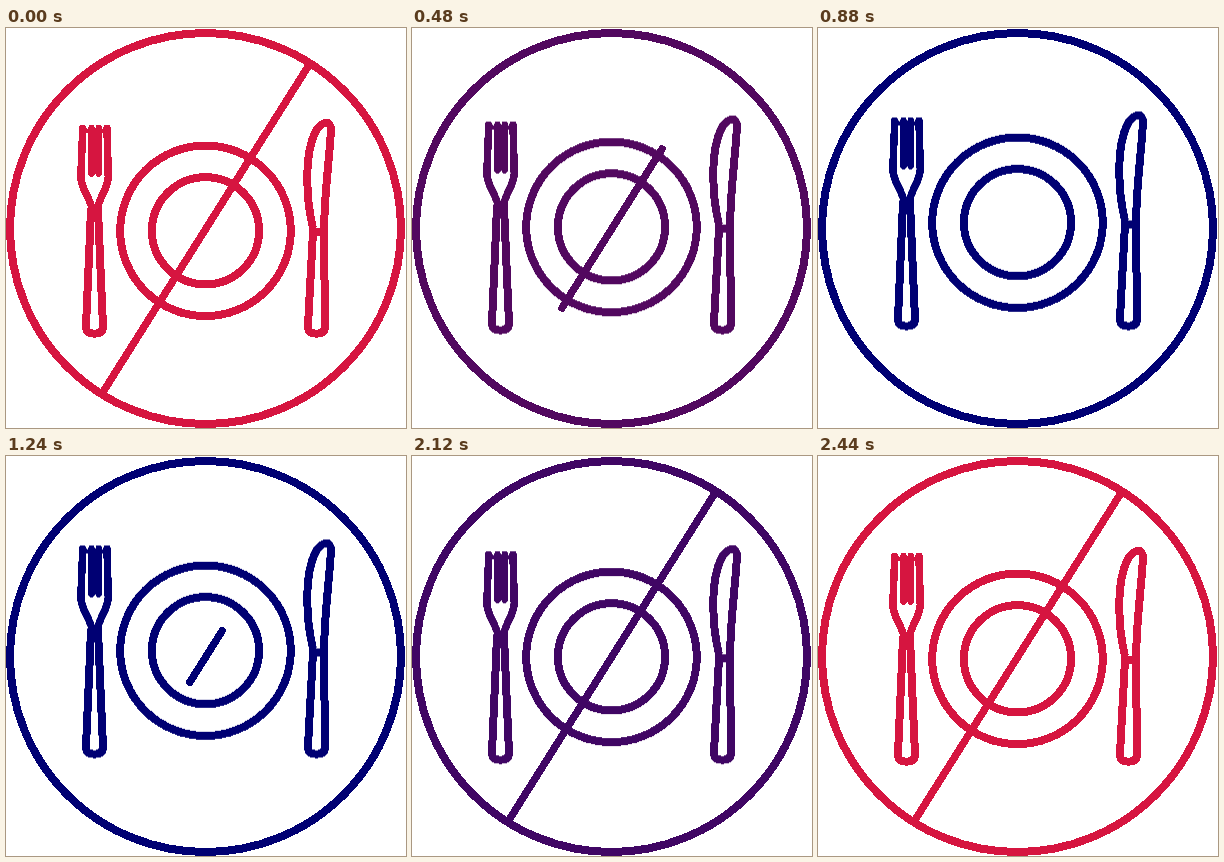
Animation, 400 px wide and 400 px high, one loop 2.64 s. Source, as an HTML page:

```html
<!DOCTYPE html>
<html lang="en">
<head>
<meta charset="utf-8">
<title>No food</title>
<style>
  :root {
    --red: #d61540;
    --navy: #000073;
  }
  html, body {
    margin: 0;
    width: 100%;
    height: 100%;
    overflow: hidden;
    background: #fff;
  }
  svg {
    display: block;
    width: 100vw;
    height: 100vh;
    fill: none;
    stroke: currentColor;
    stroke-width: 8;
    stroke-linecap: round;
    stroke-linejoin: round;
    shape-rendering: crispEdges;
    animation: tint 2640ms infinite;
  }
  .plate { --rise: -8.2px; }
  .cutlery { --rise: -7.5px; }
  .lift { animation: lift 2640ms infinite; }
  .prong { stroke-width: 7.5; }
  .tine { stroke-width: 6.5; }
  .join { stroke-width: 4; }
  .slash {
    stroke-width: 7.5;
    stroke-dasharray: 1 3;
    animation: slash 2640ms infinite;
  }

  @keyframes tint {
    0% { color: var(--red); }
    6.06% { color: var(--red); animation-timing-function: cubic-bezier(.333, .18, .667, .88); }
    27.27% { color: var(--navy); }
    73.48% { color: var(--navy); animation-timing-function: cubic-bezier(.333, 0, .667, 1); }
    92.42%, 100% { color: var(--red); }
  }
  @keyframes lift {
    0% { transform: translateY(0); }
    6.06% { transform: translateY(0); animation-timing-function: cubic-bezier(.333, 0, .667, 1); }
    31.82% { transform: translateY(var(--rise)); }
    63.64% { transform: translateY(var(--rise)); animation-timing-function: cubic-bezier(.333, 0, .667, 1); }
    87.88%, 100% { transform: translateY(0); }
  }
  /* an offset above 1 also hides the round cap at the centre */
  @keyframes slash {
    0% { stroke-dashoffset: 0; }
    12.12% { stroke-dashoffset: 0; animation-timing-function: cubic-bezier(.333, 0, .667, 1); }
    24.1% { stroke-dashoffset: 1; }
    24.11%, 37.87% { stroke-dashoffset: 1.1; }
    37.88% { stroke-dashoffset: 1; animation-timing-function: cubic-bezier(.333, 0, .667, 1); }
    74.24%, 100% { stroke-dashoffset: 0; }
  }
</style>
</head>
<body>
<svg viewBox="0 0 400 400">
  <circle cx="199.5" cy="200.5" r="195.5"/>

  <g class="plate lift">
    <circle cx="199.5" cy="202.8" r="85.3"/>
    <circle cx="199.5" cy="202.8" r="53.6"/>
  </g>

  <g class="cutlery lift">
    <!-- fork -->
    <path class="prong" d="M76.8 100.5L74.8 149C75 161 84 169 86 181"/>
    <path class="prong" d="M101 100.5L102.3 149C102 161 93 169 91.5 181"/>
    <path class="tine" d="M85.5 100V145.5M92.7 100V145.5"/>
    <path class="join" d="M77 102.5H101"/>
    <path d="M85 182L80 298Q80 305.5 87 305.5H90Q97 305.5 97 298L92 182Z"/>
    <!-- knife -->
    <path d="M306.5 198C300 170 298.5 128 308.5 106C314 94 324.5 90 325 102C323 137 318.5 162 318 203"/>
    <path d="M307 203.5H318L319 298Q319 305.5 312 305.5H309Q302 305.5 302 298Z"/>
  </g>

  <path class="slash" pathLength="1" d="M200 200.5L303 37"/>
  <path class="slash" pathLength="1" d="M200 200.5L97 364"/>
</svg>
</body>
</html>
```
